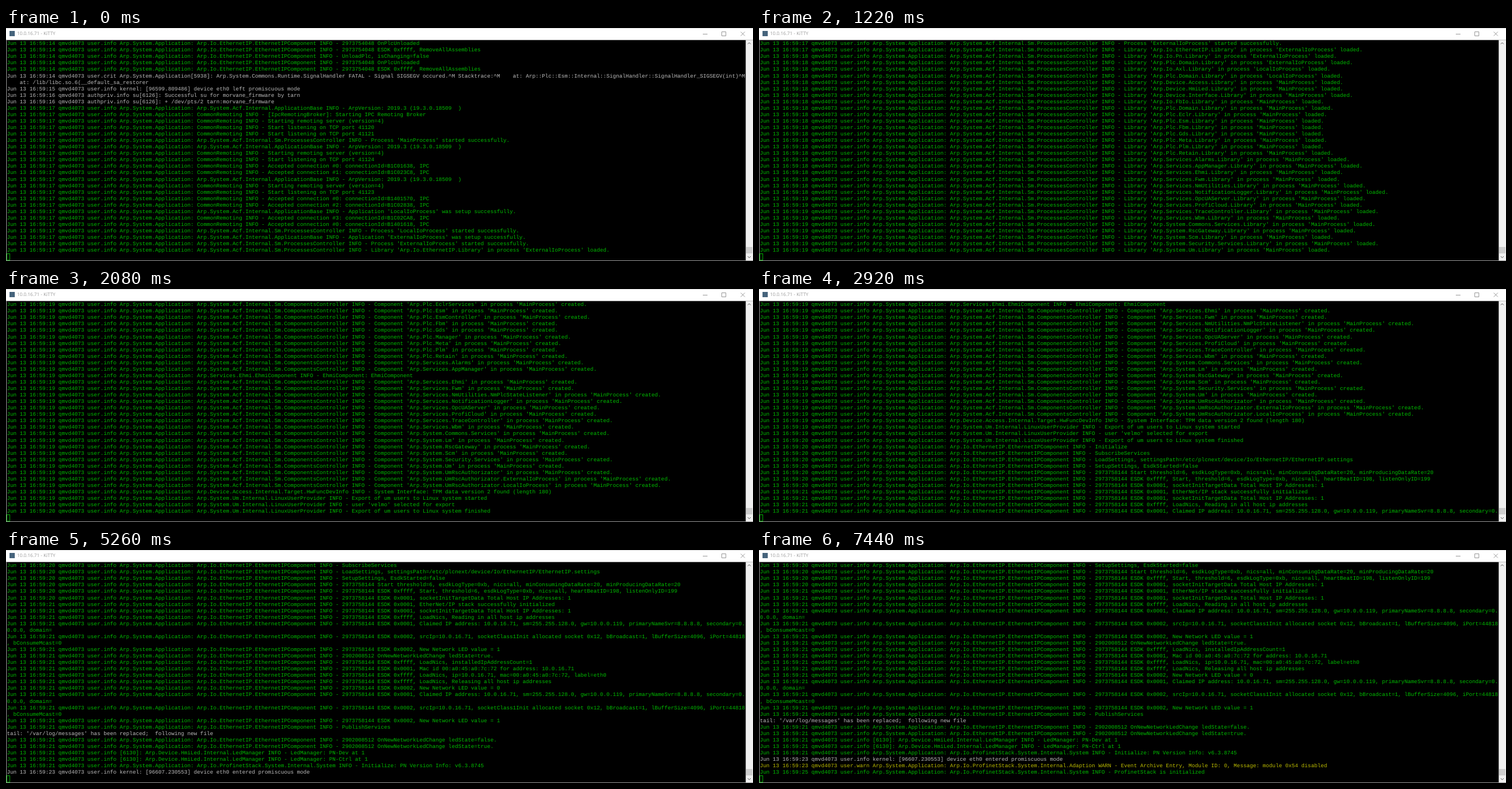
An HTML page that plays this animation: 1280x399 px, repeating every 8 s.

```html
<!DOCTYPE html>
<html lang="en">
<head>
<meta charset="utf-8">
<title>Terminal log</title>
<style>
  html, body { margin: 0; width: 100%; height: 100%; overflow: hidden; background: #000; }
  #win { position: relative; width: 1280px; height: 399px; overflow: hidden; background: #000; }
  #bar { position: absolute; left: 0; top: 0; width: 1280px; height: 20px; background: #fff;
    box-shadow: inset 0 1px #ddd; }
  #icon { position: absolute; left: 6px; top: 5px; width: 9px; height: 9px; background: #46647c; }
  #name { position: absolute; left: 19px; top: 4px; color: #999; white-space: pre;
    font: 8px/12px "Open Sans", "Noto Sans", sans-serif; text-rendering: geometricPrecision; }
  #log { position: absolute; left: 1.5px; top: 21.2px; color: #0b0;
    font: 9.217px/11.065px "Liberation Mono", "Courier New", monospace;
    text-rendering: geometricPrecision; font-variant-ligatures: none; }
  #log div { height: 11.065px; white-space: pre; }
  #log .gray { color: #bbb; }
  #log .warn { color: #bb0; }
  #cursor { position: absolute; left: 1px; top: 386px; width: 4px; height: 10px; border: 1px solid #0a0; }
  #edge { position: absolute; left: 0; top: 20px; width: 1279px; height: 377px; border: 1px solid #999;
    border-right: 0; }
  svg { position: absolute; left: 0; top: 0; }
</style>
</head>
<body>
<div id="win">
  <div id="bar"><div id="icon"></div><div id="name">10.0.16.71 - KiTTY</div></div>
  <div id="edge"></div>
  <div id="log"></div>
  <div id="cursor"></div>
  <svg width="1280" height="399" fill="none" stroke="#999">
    <path d="M1194 10.5h8M1226.5 6.5h7v7h-7zM1259 6.5l7 7M1266 6.5l-7 7"/>
    <rect x="1267.5" y="20.5" width="12.5" height="377.5" fill="#f0f0f0" stroke="none"/>
    <rect x="1268" y="375" width="11" height="11" fill="#cdcdcd" stroke="none"/>
    <path d="M1271 27.5l2.5-2.5 2.5 2.5M1271 391l2.5 2.5 2.5-2.5" stroke="#555"/>
  </svg>
</div>
<script>
const ROWS = 33, COLS = 229, LOOP = 8000;
const lines = [];

// Adds a line, wrapped at the terminal width
function put(text, tone = '') {
  for (let i = 0; i < text.length; i += COLS) lines.push({ text: text.slice(i, i + COLS), tone });
}
const stamp = sec => `Jun 13 16:59:${sec} qmvd4073 `;
const app = (sec, from, msg) => put(`${stamp(sec)}user.info Arp.System.Application: ${from} INFO - ${msg}`);

const eip = (sec, ...msgs) => msgs.forEach(m => app(sec, 'Arp.Io.EthernetIP.EthernetIPComponent', m));
const remote = (...msgs) => msgs.forEach(m => app(17, 'CommonRemoting', m));
const base = msg => app(17, 'Arp.System.Acf.Internal.ApplicationBase', msg);
const proc = (sec, msg) => app(sec, 'Arp.System.Acf.Internal.Sm.ProcessesController', msg);

const version = () => base('ArpVersion: 2019.3 (19.3.0.18509  )');
const setup = p => base(`Application '${p}Process' was setup successfully.`);
const started = p => proc(17, `Process '${p}Process' started successfully.`);
const server = 'Starting remoting server (version=4)';
const port = n => `Start listening on TCP port ${n}`;
const accept = (n, id) => `Accepted connection #${n}: connectionId=${id}, IPC`;

const libs = (sec, p, names) => names.split(' ').forEach(n =>
  proc(sec, `Library 'Arp.${n}.Library' in process '${p}Process' loaded.`));
const comps = (p, names) => names.split(' ').forEach(n =>
  app(19, 'Arp.System.Acf.Internal.Sm.ComponentsController', `Component 'Arp.${n}' in process '${p}Process' created.`));

const unload = '2973754048 OnPlcUnloaded', drop = '2973754048 ESDK 0xffff, RemoveAllAssemblies';
eip(14, unload, drop, 'UnloadPlc, isChanging=false', unload, drop);
put(stamp(14) + 'user.crit Arp.System.Application[5938]: Arp.System.Commons.Runtime.SignalHandler FATAL - ' +
  'Signal SIGSEGV occured.^M Stacktrace:^M    at: ' +
  'Arp::Plc::Esm::Internal::SignalHandler::SignalHandler_SIGSEGV(int)^M' +
  '    at: /lib/libc.so.6(__default_sa_restorer', 'gray');
put(stamp(15) + 'user.info kernel: [96599.809486] device eth0 left promiscuous mode', 'gray');
put(stamp(16) + 'authpriv.info su[6126]: Successful su for morvane_firmware by tarn', 'gray');
put(stamp(16) + 'authpriv.info su[6126]: + /dev/pts/2 tarn:morvane_firmware', 'gray');

version();
remote('[IpcRemotingBroker]: Starting IPC Remoting Broker', server, port(41120), port(41121));
started('Main');
version();
remote(server, port(41124), accept(0, 'B1C01638'), accept(1, 'B1C023C8'));
version();
remote(server, port(41123), accept(0, 'B1401570'), accept(2, 'B1C02838'));
setup('LocalIo');
remote(accept(3, 'B1C02CA8'), accept(0, 'B1401618'));
started('LocalIo');
setup('ExternalIo');
started('ExternalIo');

libs(17, 'ExternalIo', 'Io.EthernetIP');
libs(18, 'ExternalIo', 'Io.Pn Plc.Domain');
libs(18, 'LocalIo', 'Io.Axl Plc.Domain');
libs(18, 'Main', 'Device.Access Device.HmiLed Device.Interface Io.FbIo Plc.Domain Plc.Eclr Plc.Esm Plc.Fbm ' +
  'Plc.Gds Plc.Meta Plc.Plm Plc.Retain Services.Alarms Services.AppManager Services.Ehmi Services.Fwm ' +
  'Services.NmUtilities Services.NotificationLogger');
libs(19, 'Main', 'Services.OpcUAServer Services.ProfiCloud Services.TraceController Services.Wbm ' +
  'System.Commons.Services System.RscGateway System.Scm System.Security.Services System.Um ' +
  'System.UmRscAuthorizator');

eip(19, 'EthernetIPComponent');
comps('ExternalIo', 'Io.EthernetIP Io.PnC Io.PnD Io.PnS Plc.DomainProxy.ProfinetProcess');
comps('LocalIo', 'Io.AxlC Plc.DomainProxy.LocalIoProcess');
comps('Main', 'Device.Access Device.HmiLed Device.Interface Io.FbIo.AxlC Io.FbIo.EthernetIP Io.FbIo.IbM ' +
  'Io.FbIo.PnC Io.FbIo.PnD Plc.Domain Plc.Eclr Plc.EclrServices Plc.Esm Plc.EsmController Plc.Fbm Plc.Gds ' +
  'Plc.Manager Plc.Meta Plc.Plm Plc.Retain Services.Alarms Services.AppManager');
app(19, 'Arp.Services.Ehmi.EhmiComponent', 'EhmiComponent: EhmiComponent');
comps('Main', 'Services.Ehmi Services.Fwm Services.NmUtilities.NmPlcStateListener Services.NotificationLogger ' +
  'Services.OpcUAServer Services.ProfiCloud Services.TraceController Services.Wbm System.Commons.Services ' +
  'System.Lm System.RscGateway System.Scm System.Security.Services System.Um System.UmRscAuthorizator ' +
  'System.UmRscAuthorizator.ExternalIoProcess System.UmRscAuthorizator.LocalIoProcess');

app(19, 'Arp.Device.Access.Internal.Target.HwFuncDevInfo',
  'System Interface: TPM data version 2 found (length 180)');
const users = (sec, msg) => app(sec, 'Arp.System.Um.Internal.LinuxUserProvider', msg);
users(19, 'Export of um users to Linux system started');
users(19, "user 'velmo' selected for export");
users(20, 'Export of um users to Linux system finished');

const id = '2973758144 ';
const esdk = (code, msg) => `${id}ESDK 0x${code}, ${msg}`;
const hosts = esdk('0001', 'socketInitTargetData Total Host IP Addresses: 1');
const claim = esdk('0001', 'Claimed IP address: 10.0.16.71, sm=255.255.128.0, gw=10.0.0.119, ' +
  'primaryNameSvr=8.8.8.8, secondary=0.0.0.0, domain=');
const socket = esdk('0002', 'srcIp=10.0.16.71, socketClass1Init allocated socket 0x12, bBroadcast=1, ' +
  'lBufferSize=4096, iPort=44818, bConsumeMcast=0');
const led = n => esdk('0002', `New Network LED value = ${n}`);
const ledState = on => `2902008512 OnNewNetworkLedChange ledState=${on}.`;

eip(20, 'Initialize', 'SubscribeServices',
  'LoadSettings, settingsPath=/etc/plcnext/device/Io/EthernetIP/EthernetIP.settings',
  'SetupSettings, EsdkStarted=false',
  id + 'Start threshold=6, esdkLogType=0xb, nics=all, minConsumingDataRate=20, minProducingDataRate=20',
  esdk('ffff', 'Start, threshold=6, esdkLogType=0xb, nics=all, heartBeatID=198, listenOnlyID=199'),
  hosts);
eip(21, esdk('0001', 'EtherNet/IP stack successfully initialized'), hosts,
  esdk('ffff', 'LoadNics, Reading in all host ip addresses'),
  claim, socket, led(1), ledState(true),
  esdk('ffff', 'LoadNics, installedIpAddressCount=1'),
  esdk('0001', 'Mac id 00:a0:45:a0:7c:72 for address: 10.0.16.71'),
  esdk('ffff', 'LoadNics, ip=10.0.16.71, mac=00:a0:45:a0:7c:72, label=eth0'),
  esdk('ffff', 'LoadNics, Releasing all host ip addresses'),
  led(0), claim, socket, led(1), 'PublishServices');
put("tail: '/var/log/messages' has been replaced;  following new file", 'gray');
eip(21, ledState(false), ledState(true));
for (const n of ['Dev', 'Ctrl'])
  put(`${stamp(21)}user.info [6130]: Arp.Device.HmiLed.Internal.LedManager INFO - LedManager: PN-${n} at 1`);

const stack = 'Arp.Io.ProfinetStack.System.Internal.';
app(21, stack + 'System', 'Initialize: PN Version Info: v6.3.8745');
put(stamp(23) + 'user.info kernel: [96607.230553] device eth0 entered promiscuous mode', 'gray');
put(`${stamp(23)}user.warn Arp.System.Application: ${stack}Adaption WARN - ` +
  'Event Archive Entry, Module ID: 0, Message: module 0x54 disabled', 'warn');
app(25, stack + 'System', 'ProfinetStack is initialized');

// [time, first line, first line of the lower part while a redraw is torn]
const SPLIT = 16;
const steps = [
  [0, 0], [150, 7, 0], [210, 7],
  [610, 15, 7], [690, 15], [770, 19], [840, 22],
  [1220, 31],
  [1390, 36], [1460, 41], [1530, 47], [1610, 62], [1680, 78],
  [1850, 80], [1930, 82], [2080, 83],
  [2540, 84], [2620, 86], [2690, 87],
  [2920, 94], [3000, 100], [3080, 106], [3150, 111], [3230, 116],
  [5260, 117], [5335, 118, 117], [5410, 118],
  [7350, 119, 118], [7440, 119]
];

const log = document.getElementById('log');
const rows = Array.from({ length: ROWS }, () => log.appendChild(document.createElement('div')));
let shown;

function draw(now) {
  const t = now % LOOP;
  const step = steps.findLast(s => s[0] <= t) || steps[0];
  if (step !== shown) {
    shown = step;
    const [, top, low = top] = step;
    rows.forEach((row, i) => {
      const line = lines[i + (i < SPLIT ? top : low)];
      row.textContent = line.text;
      row.className = line.tone;
    });
  }
}
function tick() {
  draw(performance.now());
  requestAnimationFrame(tick);
}
tick();
</script>
</body>
</html>
```
